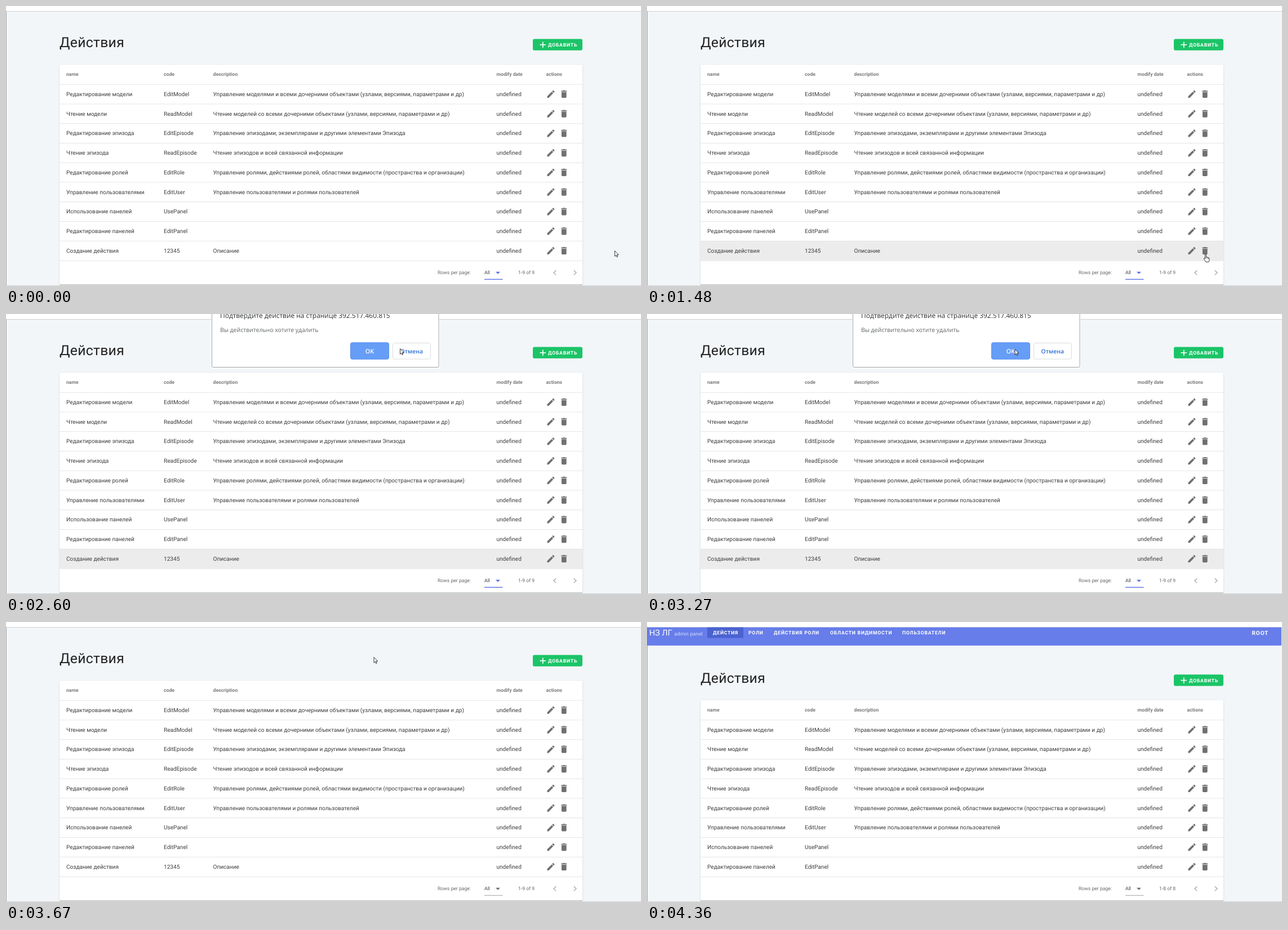
Write an HTML page with a canvas that moves like this. It is 1127 px wide and 497 px high and loops after 4750 ms.

```html
<!DOCTYPE html>
<html lang="ru">
<head>
<meta charset="utf-8">
<title>Действия</title>
<style>
html, body { margin: 0; width: 100%; height: 100%; overflow: hidden; background: #f2f6f9; }
canvas { display: block; }
</style>
</head>
<body>
<canvas id="stage" width="1127" height="497"></canvas>
<script>
const ctx = document.getElementById('stage').getContext('2d');
const LOOP = 4750;
const ROW = 34.75;
const LEFT = 95, RIGHT = 1023;
const ROBOTO = 'Roboto, Arial, sans-serif';
const DIALOG = '"Open Sans", "Noto Sans", sans-serif';
const BODY = 10.08, SMALL = 8.66;

const rows = [
  ['Редактирование модели', 'EditModel', 'Управление моделями и всеми дочерними объектами (узлами, версиями, параметрами и др)'],
  ['Чтение модели', 'ReadModel', 'Чтение моделей со всеми дочерними объектами (узлами, версиями, параметрами и др)'],
  ['Редактирование эпизода', 'EditEpisode', 'Управление эпизодами, экземплярами и другими элементами Эпизода'],
  ['Чтение эпизода', 'ReadEpisode', 'Чтение эпизодов и всей связанной информации'],
  ['Редактирование ролей', 'EditRole', 'Управление ролями, действиями ролей, областями видимости (пространства и организации)'],
  ['Управление пользователями', 'EditUser', 'Управление пользователями и ролями пользователей'],
  ['Использование панелей', 'UsePanel', ''],
  ['Редактирование панелей', 'EditPanel', ''],
  ['Создание действия', '12345', 'Описание']
];

// Pointer: start time, x, y; each position holds until the next one
const pointer = [
  [0, 1080, 434], [300, 1079.5, 434], [700, 1072.5, 435.5], [850, 1042, 438],
  [970, 1006, 439], [1100, 997, 441], [1220, 988, 441], [1480, 987.5, 440.3],
  [2360, 960, 400], [2480, 800, 190], [2600, 699, 61], [2750, 672, 56],
  [2880, 655, 60], [3030, 654, 61], [3150, 652.5, 62],
  [3810, 790, 155], [3960, 1120, 438], [4110, 1121, 455], [4240, 1122, 486],
  [4360, 1140, 510]
];

const pencil = new Path2D('M20.7 7C21.1 6.6 21.1 6 20.7 5.6L18.4 3.3C18 2.9 17.4 2.9 17 3.3L15.1 5.1L18.9 8.9ZM3 17.2V21H6.8L17.8 9.9L14.1 6.2Z');
const bin = new Path2D('M19 4H15.5L14.5 3H9.5L8.5 4H5V6H19ZM6 19A2 2 0 0 0 8 21H16A2 2 0 0 0 18 19V7H6Z');
const arrow = new Path2D('M.5 .5V10.4L2.7 8.3L4.2 11.7L5.7 11L4.2 7.7H7.3Z');
const hand = new Path2D('M3 8.5V1.6Q3 .6 4 .6T5 1.6V5.2Q7 4.7 7.2 6Q8.8 5.5 9 6.8Q10.4 6.5 10.4 8V10.5Q10.4 12 9.4 14H4.2Q3.6 12 1 9.2Q.2 8 1 7.6Q2 7.2 3 8.5Z');

const clamp = v => Math.max(0, Math.min(1, v));
const mix = (a, b, k) => `rgb(${a.map((v, i) => Math.round(v + (b[i] - v) * k))})`;

function rect(x, y, w, h, color) {
  ctx.fillStyle = color;
  ctx.fillRect(x, y, w, h);
}

function round(x, y, w, h, r, fill, stroke, width = 1) {
  ctx.beginPath();
  ctx.roundRect(x, y, w, h, r);
  if (fill) { ctx.fillStyle = fill; ctx.fill(); }
  if (stroke) { ctx.strokeStyle = stroke; ctx.lineWidth = width; ctx.stroke(); }
}

function line(points, color, width) {
  ctx.beginPath();
  for (const [x, y] of points) ctx.lineTo(x, y);
  ctx.strokeStyle = color;
  ctx.lineWidth = width;
  ctx.stroke();
}

// Text whose capitals are centred on y
function text(str, x, y, size, color, { weight = 400, font = ROBOTO, gap = 0, align = 'left' } = {}) {
  ctx.font = `${weight} ${size}px ${font}`;
  ctx.letterSpacing = gap * size + 'px';
  ctx.textRendering = 'geometricPrecision';
  ctx.textAlign = align;
  ctx.fillStyle = color;
  ctx.fillText(str, x, y + size * 0.355);
}

function icon(path, x, y) {
  ctx.save();
  ctx.translate(x, y);
  ctx.scale(0.724, 0.724);
  ctx.translate(-12, -12);
  ctx.fillStyle = '#707070';
  ctx.fill(path);
  ctx.restore();
}

function drawNav() {
  rect(0, 9.5, 1126, 32.3, '#667dea');
  rect(107, 9.5, 64, 18.8, '#4a63cf');
  text('НЗ ЛГ', 4, 19, 14.48, '#fff');
  text('admin panel', 48.5, 20.5, SMALL, '#dce2fc', { gap: 0.033 });
  const label = { weight: 700, gap: 0.089 };
  const tabs = [['ДЕЙСТИЯ', 117], ['РОЛИ', 180], ['ДЕЙСТВИЯ РОЛИ', 225], ['ОБЛАСТИ ВИДИМОСТИ', 325], ['ПОЛЬЗОВАТЕЛИ', 453]];
  for (const [name, x] of tabs) text(name, x, 18.7, SMALL, '#fff', label);
  text('ROOT', 1073.5, 19, BODY, '#fff', label);
}

function drawTop(y) {
  text('Действия', LEFT, 64.2 + y, 24.7, '#212121', { gap: 0.012 });
  round(935, 58.5 + y, 88, 20.3, 3, '#1bc467');
  rect(947.5, 68 + y, 10.5, 1.6, '#fff');
  rect(952, 63.6 + y, 1.6, 10.5, '#fff');
  text('ДОБАВИТЬ', 962, 69 + y, SMALL, '#fff', { weight: 700, gap: 0.089 });
}

function drawTable(top, count, hover) {
  ctx.save();
  ctx.shadowColor = 'rgba(0,0,0,.16)';
  ctx.shadowBlur = 3;
  ctx.shadowOffsetY = 1;
  round(LEFT, top, RIGHT - LEFT, 494 - top, 2, '#fff');
  ctx.restore();
  rect(LEFT, 494, RIGHT - LEFT, 1.4, '#c2c2c2');

  const heads = [['name', 107], ['code', 280], ['description', 367.5], ['modify date', 870.5], ['actions', 958.5]];
  for (const [name, x] of heads) text(name, x, top + 17, SMALL, '#7c7c7c', { weight: 700 });

  for (let i = 0; i < count; i++) {
    const y = top + ROW * (i + 1);
    const mid = y + ROW / 2;
    if (i === 8 && hover > 0) rect(LEFT, y, RIGHT - LEFT, ROW, mix([255, 255, 255], [236, 236, 236], hover));
    rect(LEFT, y - 0.2, RIGHT - LEFT, 0.8, '#dfdfdf');
    [107, 280, 367.5].forEach((x, k) => text(rows[i][k], x, mid, BODY, '#3e3e3e'));
    text('undefined', 870.5, mid, BODY, '#3e3e3e');
    icon(pencil, 967, mid);
    icon(bin, 990.3, mid);
  }
  rect(LEFT, 451.7, RIGHT - LEFT, 0.8, '#dfdfdf');
}

function drawFooter(count, blur) {
  const y = 473.3;
  text('Rows per page:', 766, y, SMALL, '#666');
  text('All', 849, y, SMALL, '#444');
  text(`1-${count} of ${count}`, 909, y, SMALL, '#666');
  ctx.beginPath();
  ctx.moveTo(869, 471.8);
  ctx.lineTo(877, 471.8);
  ctx.lineTo(873, 475.8);
  ctx.fillStyle = mix([92, 115, 226], [112, 112, 112], blur);
  ctx.fill();
  rect(849, 484.5 + 0.3 * blur, 32.5, 1.4 - 0.5 * blur, mix([92, 115, 226], [150, 150, 150], blur));
  line([[976.2, 469.2], [972, y], [976.2, 477.4]], '#a6a6a6', 1.3);
  line([[1007.8, 469.2], [1012, y], [1007.8, 477.4]], '#a6a6a6', 1.3);
}

function drawDialog(alpha, drop) {
  ctx.save();
  ctx.globalAlpha = alpha;
  round(364, -10, 406, 107.5, 3, 'rgba(255,255,255,.5)');
  round(365.5, -10, 402.5, 104.5, 2, '#fff', '#a4a8ac');
  const type = { font: DIALOG };
  text('Подтвердите действие на странице 392.517.460.815', 380, 3.2, 11.95, '#2b2d30', type);
  text('Вы действительно хотите удалить', 380, 28.3 + drop / 2, 10.5, '#606468', type);
  const label = { font: DIALOG, weight: 600, align: 'center' };
  round(611.5, 50.8, 68, 29.4, 3, '#669df6', '#5b92ee');
  text('OK', 645.5, 65.5 + drop, 10.8, '#fff', label);
  round(686.5, 51.5, 67, 28.5, 3, '#fff', '#dadce0');
  text('Отмена', 719.8, 65.5 + drop, 10.4, '#2a6fd6', label);
  ctx.restore();
}

function drawPointer(t) {
  const [, x, y] = pointer.findLast(p => p[0] <= t);
  const shape = t >= 1220 && t < 2360 ? hand : arrow;
  ctx.save();
  ctx.translate(x, y);
  ctx.lineJoin = 'round';
  ctx.fillStyle = '#fff';
  ctx.strokeStyle = '#222';
  ctx.lineWidth = 0.9;
  ctx.fill(shape);
  ctx.stroke(shape);
  if (shape === hand) {
    line([[5, 5.2], [5, 8]], '#222', 0.7);
    line([[7.2, 6], [7.2, 8.2]], '#222', 0.7);
    line([[9, 6.8], [9, 8.6]], '#222', 0.7);
  }
  ctx.restore();
}

function draw(t) {
  const removed = t >= 3810;
  const count = removed ? 8 : 9;
  const shift = removed ? ROW : 0;
  const hover = t < 3390 ? clamp((t - 1000) / 340) : 0;

  rect(0, 0, 1127, 497, '#f2f6f9');
  rect(0, 0, 1127, 9, '#fff');
  rect(0, 9, 1127, 1, '#cdd1d4');
  rect(0, 9, 1, 488, '#a3a6a9');
  if (removed) drawNav();
  drawTop(shift);
  drawTable(104.25 + shift, count, hover);
  drawFooter(count, clamp((t - 3330) / 340));
  rect(0, 496, 1127, 1, '#cdd0d2');
  if (t >= 2090 && t < 3540) drawDialog(t < 3390 ? 1 : 0.3, t < 2220 ? 0 : 0.6);
  drawPointer(t);
}

let start;
function tick(now) {
  start ??= now;
  draw((now - start) % LOOP);
  requestAnimationFrame(tick);
}
requestAnimationFrame(tick);
</script>
</body>
</html>
```
